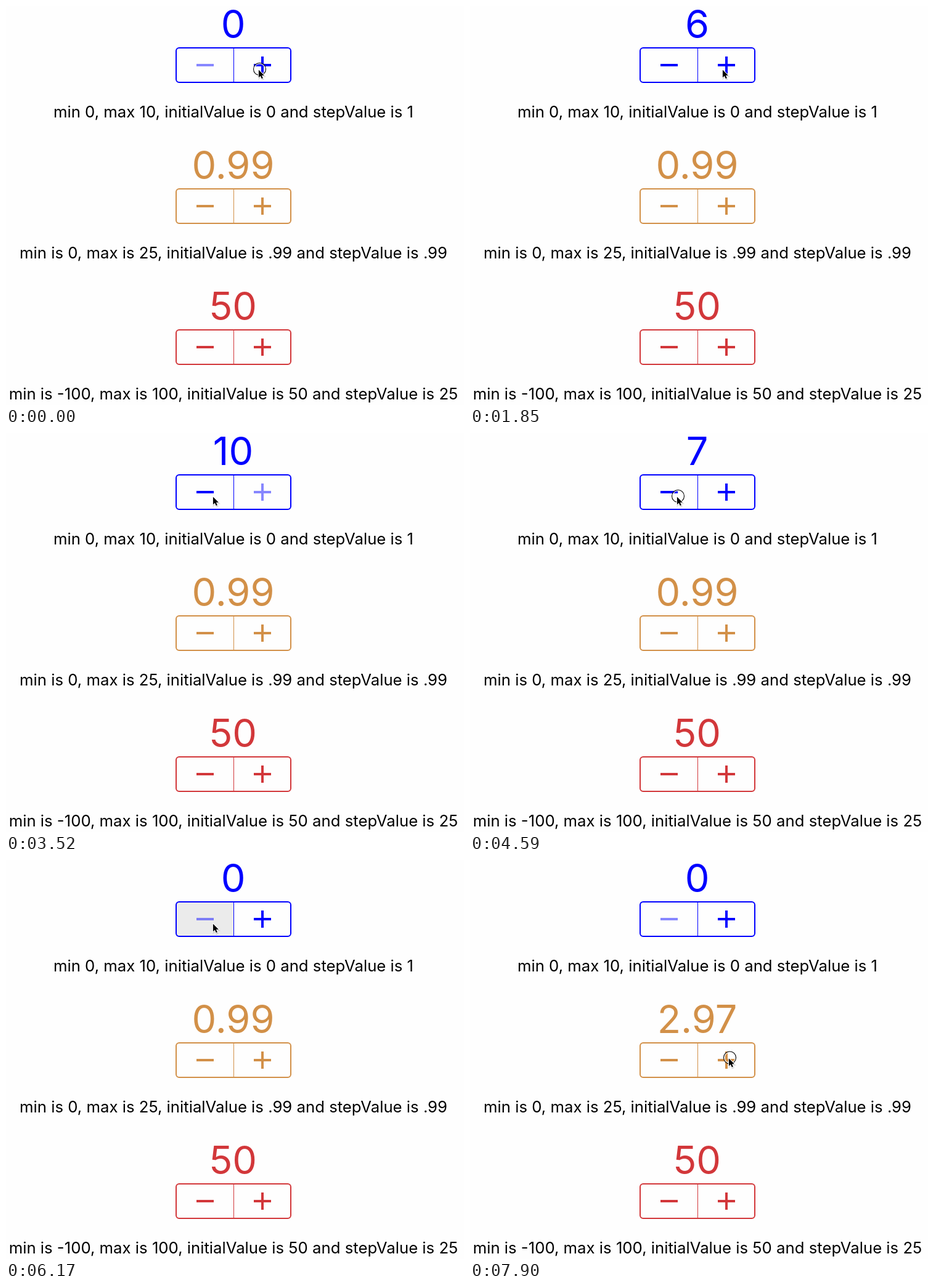
Animation, 743 px wide and 648 px high, one loop 8000 ms. Source, as an HTML page:

```html
<!DOCTYPE html>
<html lang="en">
<head>
<meta charset="utf-8">
<title>Steppers</title>
<style>
  html, body { margin: 0; width: 100%; height: 100%; overflow: hidden; background: #fefefe; }
  svg { display: block; width: 743px; height: 648px; }
  text { font-family: Inter, Roboto, sans-serif; font-optical-sizing: none; text-anchor: middle; }
  .value { font-size: 63px; }
  .caption { font-size: 25.72px; }
</style>
</head>
<body>
<svg viewBox="0 0 743 648">
  <defs><path id="arrow" d="M0 0V12.5L2.9 9.8 4.9 14.4 7 13.5 5 9H9Z"/></defs>
  <g id="rows"></g>
  <g id="cursor">
    <g id="ring" fill="none">
      <circle r="9" stroke="#fff" stroke-width="2" stroke-opacity=".75"/>
      <circle r="10" stroke="#000" stroke-width="1.1"/>
    </g>
    <g transform="translate(-1.6 1.2)">
      <use href="#arrow" x=".6" y="1.6" stroke="#000" stroke-width="2" opacity=".14"/>
      <use href="#arrow" stroke="#fff" stroke-width="1.8" paint-order="stroke"/>
    </g>
  </g>
</svg>
<script>
const LOOP = 8000, ROW_HEIGHT = 229;

const rows = [
  { color: '#0000ff', min: 0, max: 10, start: 0, step: 1, digits: 0,
    caption: 'min 0, max 10, initialValue is 0 and stepValue is 1' },
  { color: '#d29048', min: 0, max: 25, start: 0.99, step: 0.99, digits: 2,
    caption: 'min is 0, max is 25, initialValue is .99 and stepValue is .99' },
  { color: '#d2373a', min: -100, max: 100, start: 50, step: 25, digits: 0,
    caption: 'min is -100, max is 100, initialValue is 50 and stepValue is 25' }
];

// Runs of evenly spaced presses.
const bursts = [
  { row: 0, sign: 1, start: 320, period: 237, count: 5 },
  { row: 0, sign: 1, start: 1620, period: 240, count: 3 },
  { row: 0, sign: 1, start: 2440, period: 420, count: 2 },
  { row: 0, sign: -1, start: 3880, period: 236, count: 10 },
  { row: 1, sign: 1, start: 7310, period: 295, count: 3 }
];

// Delays within one press: value steps and button lights, ring hides, button dims.
const STEP = 60, RELEASE = 120, DIM = 180;

const home = { x: 411.5, y: 102.5 };
const moves = [
  { from: 2300, to: 2380, via: { x: 408.5, y: 101.5 }, end: { x: 406, y: 100.5 } },
  { from: 3060, to: 3520, via: { x: 371, y: 101.5 }, end: { x: 337.5, y: 102.5 } },
  { from: 6410, to: 7130, via: { x: 490, y: 220 }, end: { x: 421.5, y: 321 } }
];

function add(parent, tag, attrs, text = '') {
  const node = document.createElementNS('http://www.w3.org/2000/svg', tag);
  for (const name in attrs) node.setAttribute(name, attrs[name]);
  node.textContent = text;
  return parent.appendChild(node);
}

function buildRow(row, index) {
  const { color } = row;
  const group = add(document.getElementById('rows'), 'g',
    { transform: `translate(0 ${index * ROW_HEIGHT})` });
  const light = x => add(group, 'rect', { x, y: 68, width: 92.5, height: 56, rx: 4, fill: '#ebebeb' });
  const sign = d => add(group, 'path', { d, stroke: color, 'stroke-width': 4, fill: 'none' });
  row.label = add(group, 'text', { class: 'value', x: 368.5, y: 52, fill: color });
  row.lights = { '-1': light(276.5), '1': light(369.5) };
  row.minus = sign('M309 96H337');
  row.plus = sign('M402 96H430M416 82V110');
  add(group, 'rect', { x: 369, y: 68, width: 1, height: 56, fill: color });
  add(group, 'rect', { x: 276, y: 68, width: 186, height: 56, rx: 5,
    fill: 'none', stroke: color, 'stroke-width': 2 });
  add(group, 'text', { class: 'caption', x: 369, y: 181 }, row.caption);
}

function cursorAt(t) {
  let { x, y } = home;
  for (const { from, to, via, end } of moves) {
    const p = Math.min(1, Math.max(0, (t - from) / (to - from)));
    const u = p * p * (3 - 2 * p), v = 1 - u;
    const curve = (a, b, c) => a * v * v + 2 * b * u * v + c * u * u;
    x = curve(x, via.x, end.x);
    y = curve(y, via.y, end.y);
  }
  return `translate(${x} ${y})`;
}

function burstAt({ start, period, count }, t) {
  const begun = after => Math.min(count, Math.max(0, Math.floor((t - start - after) / period) + 1));
  const steps = begun(STEP);
  return { steps, ring: begun(0) > begun(RELEASE), lit: steps > begun(DIM) };
}

const cursor = document.getElementById('cursor');
const ring = document.getElementById('ring');
const show = (node, on) => node.setAttribute('visibility', on ? 'visible' : 'hidden');
const fade = (node, disabled) => node.setAttribute('opacity', disabled ? 0.47 : 1);

function render(t) {
  let ringOn = t < STEP;
  rows.forEach((row, index) => {
    let value = row.start;
    const lit = { '-1': false, '1': false };
    for (const burst of bursts.filter(b => b.row === index)) {
      const state = burstAt(burst, t);
      value += burst.sign * state.steps * row.step;
      ringOn ||= state.ring;
      lit[burst.sign] ||= state.lit;
    }
    row.label.textContent = value.toFixed(row.digits);
    fade(row.minus, value <= row.min);
    fade(row.plus, value >= row.max);
    for (const side in lit) show(row.lights[side], lit[side]);
  });
  show(ring, ringOn);
  cursor.setAttribute('transform', cursorAt(t));
}

rows.forEach(buildRow);
render(0);
const begin = performance.now();
(function tick() {
  render((performance.now() - begin) % LOOP);
  requestAnimationFrame(tick);
})();
</script>
</body>
</html>
```
